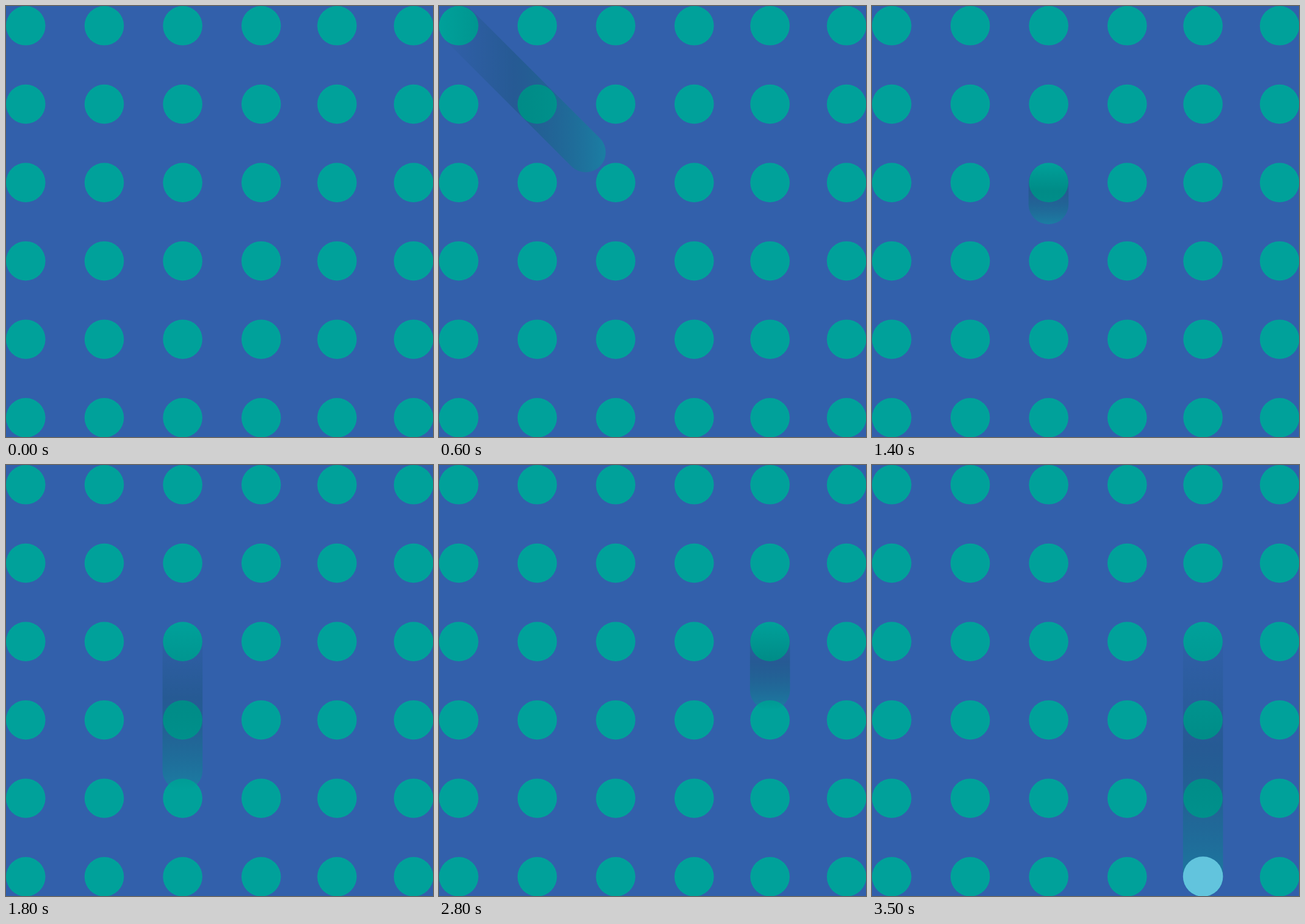
An HTML page with a canvas for the animation above (4 s loop, 700 by 707 pixels).

```html
<!DOCTYPE html>
<html>
<head>
<meta charset="utf-8">
<style>
html, body { margin: 0; height: 100%; overflow: hidden; background: #3260ab; }
canvas { display: block; }
</style>
</head>
<body>
<canvas id="stage" width="700" height="707"></canvas>
<script>
const ctx = document.getElementById('stage').getContext('2d');
const LOOP = 4000, STEP = 100, R = 32.8;
const cols = [32.3, 161, 289.6, 418.3, 542.6, 668.1];
const rows = [32.3, 161, 289.6, 418.2, 546.7, 675.3];

// Each move: time span, start point, direction, distance, first offset,
// speed per step, step at which the ball is fully lit, ball colour
const moves = [
  { from: 100, to: 1400, x: 32.5, y: 32, dx: 1, dy: 1, dist: 257, first: -2, speed: 42, lit: 8, color: '#f2c045' },
  { from: 1400, to: 2600, x: 289.4, y: 289.3, dx: 0, dy: 1, dist: 257, first: 36, speed: 44, lit: 7, color: '#f2c045' },
  { from: 2600, to: 4000, x: 542.6, y: 289.3, dx: 0, dy: 1, dist: 385.7, first: -18, speed: 49, lit: 9, color: '#62c4dd' }
];

function disc(x, y, r, color) {
  ctx.fillStyle = color;
  ctx.beginPath();
  ctx.arc(x, y, r, 0, 2 * Math.PI);
  ctx.fill();
}

function trail(m, d) {
  const x = m.x + m.dx * d, y = m.y + m.dy * d;
  // The shade runs across for the diagonal and down for the verticals
  const g = m.dx
    ? ctx.createLinearGradient(m.x - R, 0, x + R, 0)
    : ctx.createLinearGradient(0, m.y - R, 0, y + R);
  g.addColorStop(0, 'rgba(0,71,75,0)');
  g.addColorStop(0.45, 'rgba(0,71,75,0.24)');
  g.addColorStop(1, 'rgba(0,161,154,0.46)');
  ctx.strokeStyle = g;
  ctx.lineWidth = 2 * R;
  ctx.lineCap = 'round';
  ctx.beginPath();
  ctx.moveTo(m.x, m.y);
  ctx.lineTo(x, y);
  ctx.stroke();
}

function draw(now) {
  const t = now % LOOP;
  ctx.fillStyle = '#3260ab';
  ctx.fillRect(0, 0, 700, 707);
  for (const y of rows) for (const x of cols) disc(x, y, 32.3, '#00a19a');

  const m = moves.find(m => t >= m.from && t < m.to);
  if (m) {
    const k = Math.floor((t - m.from) / STEP);
    trail(m, Math.min(m.dist, Math.max(4, m.first + m.speed * k)));
    if (k >= m.lit - 1) {
      ctx.globalAlpha = k < m.lit ? 0.5 : 1;
      disc(m.x + m.dx * m.dist, m.y + m.dy * m.dist, R, m.color);
      ctx.globalAlpha = 1;
    }
  }
}

const start = performance.now();
function tick() {
  draw(performance.now() - start);
  requestAnimationFrame(tick);
}
tick();
</script>
</body>
</html>
```
